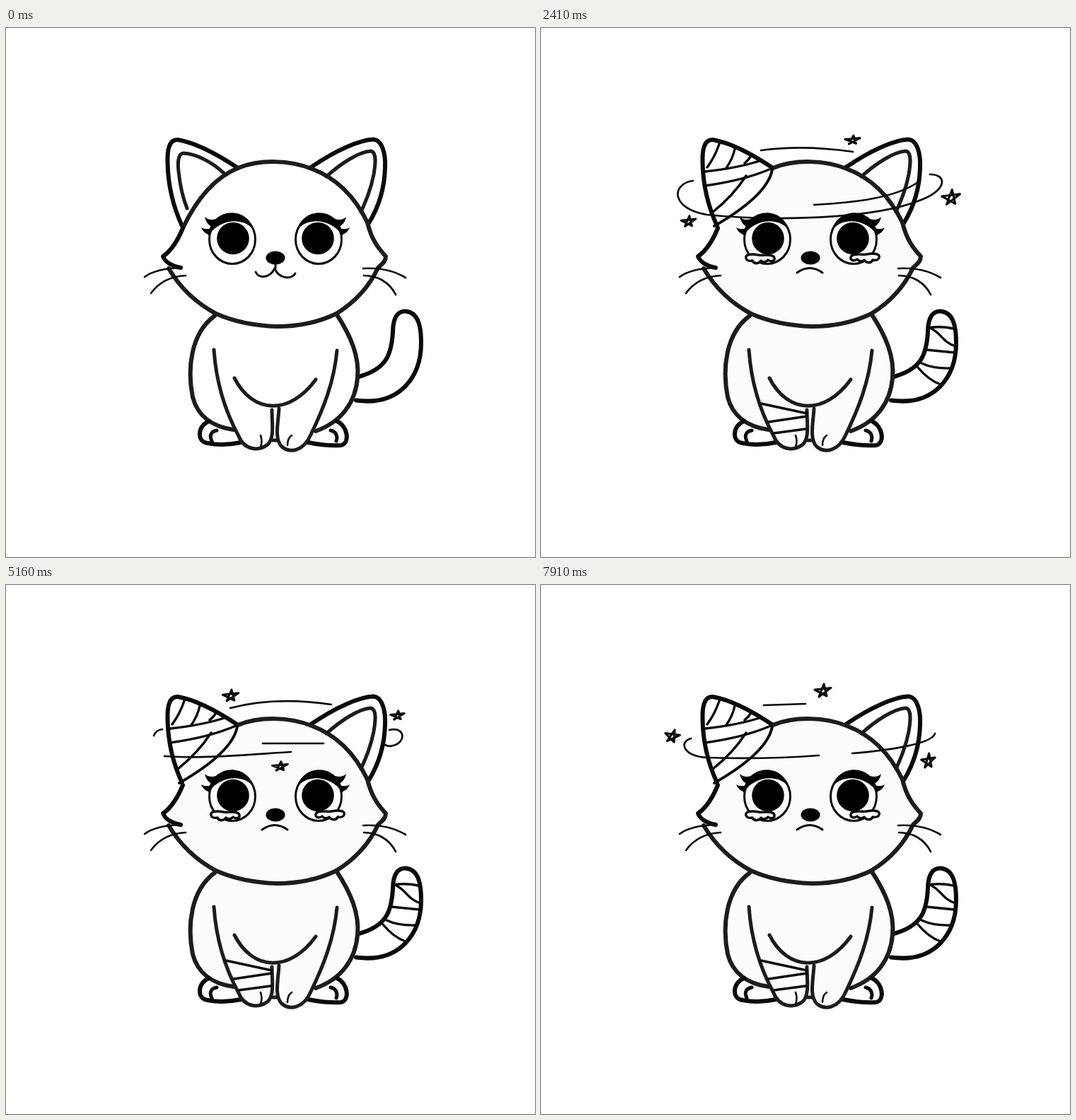
Animation of 748 by 748 pixels, one loop 8 s. Source, as an HTML page:

```html
<!DOCTYPE html>
<html lang="en">
<head>
<meta charset="utf-8">
<title>Dizzy bandaged cat</title>
<style>
html, body { margin: 0; width: 100%; height: 100%; overflow: hidden; background: #fff; }
svg { display: block; width: 100vw; height: 100vh; }
.ink { fill: none; stroke: #0a0a0a; stroke-width: 6; stroke-linecap: round; stroke-linejoin: round; }
.mid { stroke-width: 5; }
.thin { stroke-width: 2.7; }
.wrap { stroke-width: 3.4; }
.solid { fill: #000; stroke: none; }
.soft { stroke: #1c1c1c; }
.pale { fill: #fcfcfc; stroke: none; }

/* every change is a hard cut */
.step { opacity: 0; animation: 8s step-end infinite; }
#smile { animation-name: smile; }
#well { animation-name: well; }
#wraps { animation-name: wraps; }
#bareEar { animation-name: bareEar; }
#cry { animation-name: cry; }
#shade { animation-name: shade; }
#spinA { animation-name: spinA; }
#spinB { animation-name: spinB; }
#spinC { animation-name: spinC; }
@keyframes smile { 0% { opacity: 1 } 2%, 100% { opacity: 0 } }
@keyframes well { 0%, 6.75%, 100% { opacity: 0 } 2% { opacity: 1 } }
@keyframes bareEar { 0% { opacity: 1 } 4%, 100% { opacity: 0 } }
@keyframes wraps { 0% { opacity: 0 } 4%, 100% { opacity: 1 } }
@keyframes cry { 0% { opacity: 0 } 6.75%, 100% { opacity: 1 } }
@keyframes shade { 0% { opacity: 0 } 9.5%, 100% { opacity: 1 } }
@keyframes spinA {
  0%, 16.375%, 37%, 57.625%, 78.25%, 98.875%, 100% { opacity: 0 }
  9.5%, 30.125%, 50.75%, 71.375%, 92% { opacity: 1 }
}
@keyframes spinB {
  0%, 23.25%, 43.875%, 64.5%, 85.125% { opacity: 0 }
  16.375%, 37%, 57.625%, 78.25%, 98.875%, 100% { opacity: 1 }
}
@keyframes spinC {
  0%, 30.125%, 50.75%, 71.375%, 92%, 100% { opacity: 0 }
  23.25%, 43.875%, 64.5%, 85.125% { opacity: 1 }
}
</style>
</head>
<body>
<svg viewBox="0 0 748 748" class="ink">
  <defs>
    <g id="eye">
      <ellipse cx="320" cy="299" rx="32.500" ry="34.500" stroke-width="3"/>
      <circle class="solid" cx="321" cy="297.500" r="22.800"/>
      <path class="solid" d="M286 294C289 253 342 250 351 287C341 269 304 266 286 294Z"/>
      <path class="solid" d="M276 282Q282 286 290 283L288 293Q279 290 276 282ZM281 267Q287 273 297 270L291 281Q283 277 281 267Z"/>
    </g>
    <path id="tear" class="wrap" fill="#fcfcfc" d="M290 326C288 320 297 319 308 321C318 322 328 319 330 325C331 330 325 331 321 328C319 331 314 332 311 329C308 334 301 334 299 329C295 330 291 329 290 326Z"/>
    <path id="star" d="M-5 10L2-10L6 9L-11-1L12-4Z" stroke-width="3" vector-effect="non-scaling-stroke"/>
  </defs>

  <g id="shade" class="step pale">
    <path d="M328 198C360 185 402 187 432 199C470 213 495 242 511 275L537 323L526 339C514 365 496 386 467 404Q383 440 297 404C269 389 246 367 230 340L222 323L250 283Z"/>
    <path d="M295 407H467C500 455 510 520 462 560L430 575Q410 604 381 580Q345 605 322 568C250 565 245 450 295 407Z"/>
  </g>

  <!-- tail -->
  <path d="M499 493C538 482 545 462 547 430C547 408 555 400 565 400.500C584 402 587 424 587 445C587 492 558 535 495 526.500"/>

  <!-- body and feet -->
  <path class="soft" d="M295 407C261 432 256 482 264 522C271 549 292 564 322 568"/>
  <path class="soft" d="M467 404C488 436 500 465 497 495C494 530 474 557 438 570"/>
  <path d="M287 556C271 562 269 585 285 587C300 590 318 589 332 586"/>
  <path d="M468 556C483 563 487 586 474 590C458 591 442 589 427 586"/>
  <path class="mid" d="M298 569C288 571 288 578 291 584M459 569C468 571 469 579 467 584"/>
  <path class="soft mid" d="M294 455C297 500 310 542 329 577C337 597 357 599 370 589C380 580 376 558 376 540"/>
  <path class="soft mid" d="M468 456C464 500 449 538 431 575C421 598 402 602 390 592C379 581 385 558 386 538"/>
  <path class="soft mid" d="M323 495C349 546 401 548 438 497M377 583H383"/>
  <path stroke-width="2.600" d="M360 576Q363 585 360 592M404 576Q398 580 398 590"/>

  <!-- ears -->
  <path d="M328 198C298 178 266 162 243 158C230 157 228 174 228.500 190C229 225 238 256 249 280"/>
  <path d="M431 197C466 173 500 158 520 157.500C532 159 537 178 536 198C535 232 524 258 513 276"/>
  <path class="mid soft" d="M453 210C472 193 498 175 516 174C525 176 522 195 520 207C516 228 509 244 502 260"/>

  <!-- head -->
  <g id="bareEar" class="step">
    <path class="mid soft" d="M310 207C290 188 268 178 251 177C242 178 243 193 244 203C246 222 250 240 256 255"/>
    <path class="soft" d="M328 198C294 212 268 245 250 283"/>
  </g>
  <path class="soft" d="M328 198C360 185 402 187 432 199C470 213 495 242 511 275C517 300 527 312 537 323C537 331 530 335 526 339C514 365 496 386 467 404C440 417 412 422 383 422C350 421 322 415 297 404C269 389 246 367 230 340"/>
  <path d="M250 283C241 305 232 316 222 323C225 331 235 337 247 339"/>
  <g class="thin">
    <path d="M196 352Q212 340 247 339M205 375C216 360 232 351 254 350"/>
    <path d="M505 340Q540 338 565 353M506 350C525 350 542 359 551 377"/>
  </g>

  <!-- face -->
  <use href="#eye"/>
  <use href="#eye" transform="translate(762 0) scale(-1 1)"/>
  <ellipse class="solid" cx="381" cy="325" rx="13.500" ry="9.500"/>
  <g id="smile" class="step">
    <path stroke-width="3" d="M381 333V340M353 345C357 354 372 355 380 340C386 355 404 356 409 347"/>
  </g>
  <g id="well" class="step">
    <path stroke-width="3" d="M364 344Q380 338 397 344"/>
    <path stroke-width="3" d="M294 324Q310 330 327 324M437 324Q453 330 470 324"/>
  </g>
  <g id="cry" class="step">
    <path stroke-width="3" d="M362 346Q380 333 398 346"/>
    <use href="#tear"/>
    <use href="#tear" transform="translate(768 -1) scale(-1 1)"/>
  </g>

  <!-- bandages -->
  <g id="wraps" class="step wrap">
    <path d="M327 200C322 229 285 257 245 280" stroke-width="4"/>
    <path d="M232 203C260 200 288 195 312 187M232 223C268 218 300 210 325 199"/>
    <path d="M252 164Q246 182 235 197M274 171Q271 185 262 198M297 181Q293 187 288 191"/>
    <path d="M290 209Q272 237 242 261"/>
    <path d="M311 531L376 545M322 557L376 549M329 573L374 567"/>
    <path d="M548 424Q565 421 583 425M552 425C566 432 568 444 586 450M545 455L585 459M538 474Q555 482 580 481M533 480Q548 498 565 504"/>
  </g>

  <!-- circling stars -->
  <g id="spinA" class="step thin">
    <path d="M215 216C184 220 183 256 235 264C320 273 470 272 540 242C573 229 575 207 550 207"/>
    <path d="M386 250C440 247 500 241 533 218M311 173Q370 165 441 175"/>
    <use href="#star" transform="translate(440 158) scale(.92 .6)"/>
    <use href="#star" transform="translate(579 239) scale(1.12 1.05)"/>
    <use href="#star" transform="translate(208 273) scale(.9 .75)"/>
  </g>
  <g id="spinB" class="step thin">
    <path d="M212 217C194 222 202 243 235 244C290 246 340 245 393 241"/>
    <path d="M440 238C490 234 553 225 557 210M315 170L374 168"/>
    <use href="#star" transform="translate(398 149) scale(1 .9)"/>
    <use href="#star" transform="translate(185 213) rotate(15) scale(.9)"/>
    <use href="#star" transform="translate(547 248) scale(.85 1)"/>
  </g>
  <g id="spinC" class="step thin">
    <path d="M221 204Q212 205 209 213M224 242C280 246 340 240 403 236M363 224H449"/>
    <path d="M317 174Q380 157 460 169M542 205C560 200 567 216 553 225Q543 230 536 226"/>
    <use href="#star" transform="translate(317 156) scale(.98 .8)"/>
    <use href="#star" transform="translate(553 184) scale(.85 .62)"/>
    <use href="#star" transform="translate(387 256) scale(.95 .62)"/>
  </g>
</svg>
</body>
</html>
```
